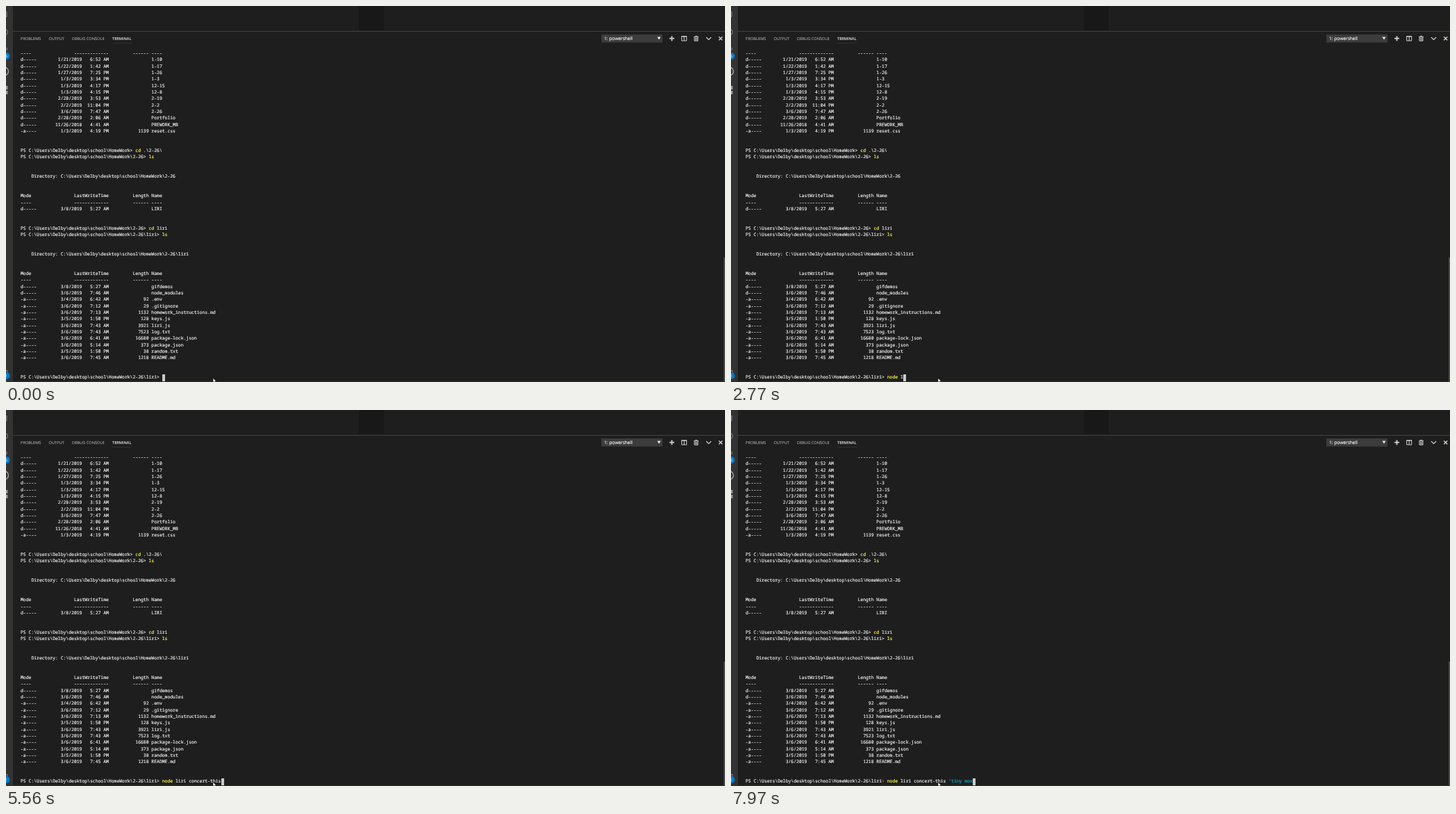
An HTML page that plays this animation: 1035x541 px, repeating every 8 s.

```html
<!DOCTYPE html>
<html lang="en">
<head>
<meta charset="utf-8">
<title>Terminal</title>
<style>
  html, body { margin: 0; width: 100%; height: 100%; overflow: hidden; background: #1e1e1e; }
  svg, pre, #cursor { position: absolute; left: 0; top: 0; }
  svg { width: 1035px; height: 541px; font-family: 'Open Sans', 'Noto Sans', sans-serif; }
  text { text-rendering: geometricPrecision; }
  pre {
    left: 21px; top: 63px; margin: 0; color: #e8e8e8;
    font: 6.415px/9.333px 'Noto Sans Mono', monospace;
    -webkit-text-stroke: .2px;
    font-variant-ligatures: none; text-rendering: geometricPrecision;
  }
  b { font-weight: inherit; color: #f8f843; }
  #gt.open { color: #f14c4c; }
  #str { color: #11a8cd; }
  #cursor { top: 530px; width: 3.85px; height: 9.6px; background: #ccc; }
</style>
</head>
<body>
<svg viewBox="0 0 1035 541">
  <!-- activity bar -->
  <path fill="#333" d="M0 0h10v541H0z"/>
  <g fill="none" stroke="#8a8a8a">
    <path d="M0 8.5h1v7H0"/>
    <circle cx="-1.5" cy="37.5" r="4"/>
    <path d="M0 59.5q2.5 1 1 4l-1 1"/>
    <circle cx="-2.5" cy="94" r="6" stroke="#aaa" stroke-width="1.3"/>
    <path d="M0 524.5h2v3"/>
  </g>
  <path fill="#9a9a9a" d="M0 115h2.5v5H0zM0 122h2.5v5H0z"/>
  <g fill="#007acc"><circle cx=".5" cy="72" r="5"/><circle cx=".5" cy="532" r="5"/></g>
  <g fill="#fff" font-size="5"><text x="-.5" y="74">5</text><text x="-1" y="534">1</text></g>

  <!-- editor remainder and panel header -->
  <path fill="#181818" d="M508 0h36v35h-36z"/>
  <path fill="#414141" d="M10 36h1025v1H10zM153 53.5h28.5v.6H153z"/>
  <g fill="#a2a2a2" stroke="#a2a2a2" stroke-width=".12" font-size="5.7">
    <text x="21" y="48.8">PROBLEMS</text>
    <text x="61.5" y="48.8">OUTPUT</text>
    <text x="95" y="48.8">DEBUG CONSOLE</text>
    <text x="153" y="48.8" fill="#f0f0f0" stroke="#f0f0f0">TERMINAL</text>
  </g>
  <path fill="#3c3c3c" d="M857 41h88v11.5h-88z"/>
  <text x="861" y="49" fill="#f4f4f4" stroke="#f4f4f4" stroke-width=".15" font-size="6.6">1: powershell</text>
  <path fill="#eee" d="M937.5 44.5h5l-2.5 4z"/>
  <g fill="none" stroke="#d0d0d0">
    <path stroke-width="1.8" d="M955 46.7h7M958.5 43.2v7"/>
    <path d="M972.7 43.5h7v6.5h-7zM976.2 43.5v6.5M972.5 44h7.5"/>
    <path d="M990 44.3h7M992 43.3h3M991 45v5.2h5V45M992.7 45.5v4M994.4 45.5v4"/>
    <path stroke-width="1.2" d="M1008 45l3.5 3.5L1015 45"/>
    <path stroke-width="1.4" d="M1026.2 44.2l5 5M1031.2 44.2l-5 5"/>
  </g>
  <path fill="#4a4a4a" d="M1033 362h2v178h-2z"/>
  <path fill="#47204f" d="M0 540h1035v1H0z"/>
</svg>

<pre>
----                -------------         ------ ----
d-----        1/21/2019   6:52 AM                1-10
d-----        1/22/2019   1:42 AM                1-17
d-----        1/27/2019   7:25 PM                1-26
d-----         1/3/2019   3:34 PM                1-3
d-----         1/3/2019   4:17 PM                12-15
d-----         1/3/2019   4:15 PM                12-8
d-----        2/28/2019   3:53 AM                2-19
d-----         2/2/2019  11:04 PM                2-2
d-----         3/6/2019   7:47 AM                2-26
d-----        2/28/2019   2:06 AM                Portfolio
d-----       11/26/2018   4:41 AM                PREWORK_MB
-a----         1/3/2019   4:19 PM           1139 reset.css


PS C:\Users\Delby\desktop\school\HomeWork&gt; <b>cd</b> .\2-26\
PS C:\Users\Delby\desktop\school\HomeWork\2-26&gt; <b>ls</b>


    Directory: C:\Users\Delby\desktop\school\HomeWork\2-26


Mode                LastWriteTime         Length Name
----                -------------         ------ ----
d-----         3/8/2019   5:27 AM                LIRI


PS C:\Users\Delby\desktop\school\HomeWork\2-26&gt; <b>cd</b> liri
PS C:\Users\Delby\desktop\school\HomeWork\2-26\liri&gt; <b>ls</b>


    Directory: C:\Users\Delby\desktop\school\HomeWork\2-26\liri


Mode                LastWriteTime         Length Name
----                -------------         ------ ----
d-----         3/8/2019   5:27 AM                gifdemos
d-----         3/6/2019   7:46 AM                node_modules
-a----         3/4/2019   6:42 AM             92 .env
-a----         3/6/2019   7:12 AM             29 .gitignore
-a----         3/6/2019   7:13 AM           1132 homework_instructions.md
-a----         3/5/2019   1:50 PM            128 keys.js
-a----         3/6/2019   7:43 AM           3921 liri.js
-a----         3/6/2019   7:43 AM           7523 log.txt
-a----         3/6/2019   6:41 AM          16680 package-lock.json
-a----         3/6/2019   5:14 AM            373 package.json
-a----         3/5/2019   1:50 PM             38 random.txt
-a----         3/6/2019   7:45 AM           1218 README.md


PS C:\Users\Delby\desktop\school\HomeWork\2-26\liri<span id="gt">&gt;</span> <b id="cmd"></b><span id="args"></span><span id="str"></span></pre>
<div id="cursor"></div>
<svg viewBox="0 0 1035 541">
  <path fill="#fff" stroke="#000" stroke-width=".5" d="M298 535.5v6l1.5-1.2 1 2 1-.5-.8-1.8h1.8z"/>
</svg>

<script>
const LOOP = 8000, CHAR = 3.849, START = 225;
const keys = "node liri concert-this ti\b\b'tiny mox";
// when each key is pressed, in ms
const times = [
  2080, 2200, 2390, 2450, 2640,
  2770, 2960, 3080, 3200, 3320,
  3570, 3630, 3890, 4450, 4540, 4630, 4880, 5060, 5250, 5370, 5370, 5560,
  5750, 5870, 5990, 6300, 6430,
  6670, 6940, 7020, 7100, 7410, 7720, 7800, 7890, 7970
];
const el = id => document.getElementById(id);

function typedAt(t) {
  let line = '';
  times.forEach((at, i) => {
    if (t >= at) line = keys[i] === '\b' ? line.slice(0, -1) : line + keys[i];
  });
  return line;
}

function draw() {
  const t = performance.now() % LOOP;
  const line = typedAt(t);
  const quote = line.indexOf("'");
  const end = quote < 0 ? line.length : quote;
  el('cmd').textContent = line.slice(0, 4);
  el('args').textContent = line.slice(4, end);
  el('str').textContent = line.slice(end);
  el('gt').className = quote < 0 ? '' : 'open';
  el('cursor').style.left = START + CHAR * line.length + 'px';
  el('cursor').style.visibility = t >= 1200 && t < 1700 ? 'hidden' : 'visible';
  requestAnimationFrame(draw);
}
draw();
</script>
</body>
</html>
```
